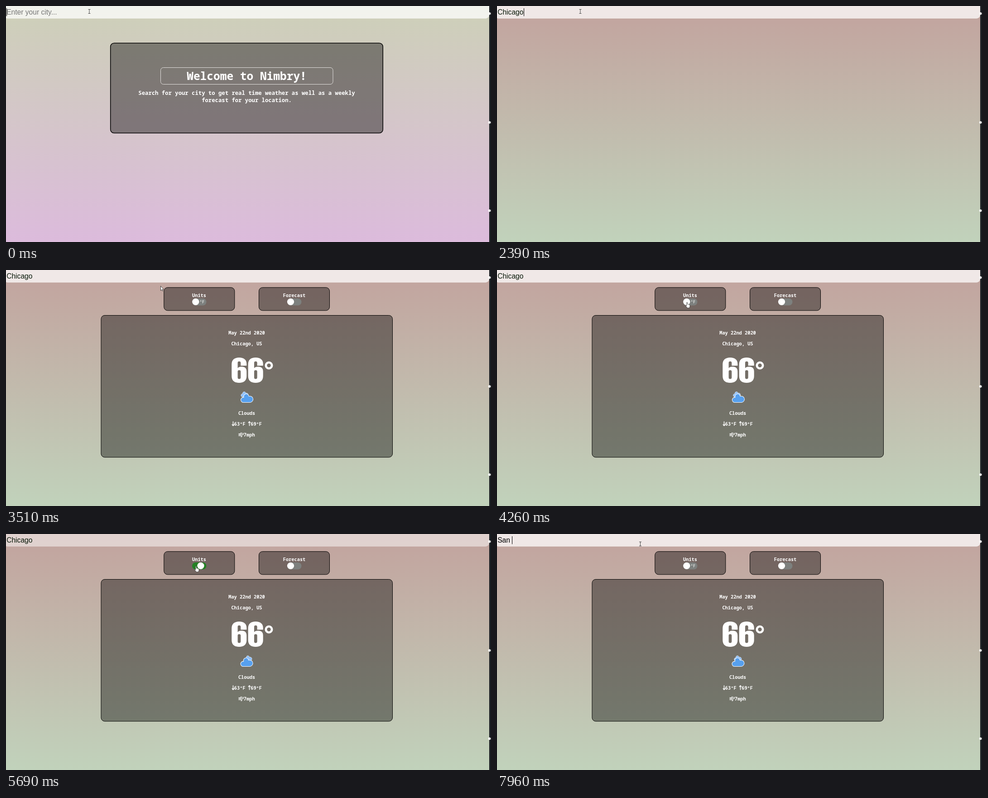
An HTML page for the animation above (7.99 s loop, 1071 by 523 pixels).

```html
<!DOCTYPE html>
<html lang="en">
<head>
<meta charset="utf-8">
<title>Weather search</title>
<style>
html, body { margin: 0; width: 100%; height: 100%; overflow: hidden; }
svg { display: block; }
text { white-space: pre; }
.field { font: 15.6px "Liberation Sans", Arial, sans-serif; }
.mono { font-family: "Noto Sans Mono", Consolas, monospace; fill: #fff; }
.mid { text-anchor: middle; }
.title { font-size: 24.5px; font-weight: 700; }
.intro { font-size: 12.28px; font-weight: 700; }
.small { font-size: 10.33px; font-weight: 600; }
.unit { font-size: 9px; font-weight: 500; }
.card { fill: #000; fill-opacity: .405; stroke: #000; }
.cloud { stroke: #fff; stroke-width: 1.2; stroke-linejoin: round; }
.line { fill: none; stroke: #fff; stroke-width: 1.5; stroke-linecap: round; stroke-linejoin: round; }
</style>
</head>
<body>
<svg width="1071" height="523" viewBox="0 0 1071 523">
  <defs>
    <linearGradient id="warm" x2="0" y2="1"><stop stop-color="#cdd0b8"/><stop offset="1" stop-color="#dcbbdc"/></linearGradient>
    <linearGradient id="cool" x2="0" y2="1"><stop stop-color="#c2a39e"/><stop offset="1" stop-color="#c1d2bb"/></linearGradient>
    <path id="puff" d="M47.7 35.4c0-4.6-3.7-8.2-8.2-8.2-1 0-1.9.2-2.8.5-.3-3.4-3.1-6.2-6.6-6.2-3.7 0-6.7 3-6.7 6.7 0 .8.2 1.6.4 2.3-.3-.1-.7-.1-1-.1-3.7 0-6.7 3-6.7 6.7 0 3.6 2.9 6.6 6.5 6.7h17.2c4.4-.5 7.9-4 7.9-8.4z"/>
    <path id="six" fill-rule="evenodd" d="M33 18H20V12C20 9.500 19 8.500 16.600 8.500S13.300 9.500 13.300 12V23.500C15 21.500 18 20.300 22 20.300C29.500 20.300 33 24 33 31V41C33 51 27 56 16.500 56S0 51 0 41V15C0 5 6 0 16.500 0S33 5 33 14ZM13.300 31V44C13.300 46.500 14.300 47.500 16.600 47.500S20 46.500 20 44V31C20 29 19 28 16.600 28S13.300 29 13.300 31Z"/>
    <path id="one" d="M23 0V55H10V21C10 15 9 13.500 0 13.500V7.500C8 6 12 4 14.500 0Z"/>
    <circle id="degree" r="6.600" fill="none" stroke="#fff" stroke-width="4.800"/>
    <path id="down" class="line" d="M0-4.500V4.500M-2.200 2L0 4.700L2.200 2"/>
  </defs>

  <rect id="sky" width="1067" height="523"/>

  <g id="welcome">
    <rect class="card" x="230.700" y="82.200" width="601.600" height="199.300" rx="8" stroke-width="1.500"/>
    <rect x="341.500" y="136.500" width="380.500" height="37" rx="6" fill="none" stroke="#e3e1df"/>
    <text class="mono mid title" x="531.500" y="164">Welcome to Nimbry!</text>
    <text class="mono mid intro" x="531.500" y="197">Search for your city to get real time weather as well as a weekly</text>
    <text class="mono mid intro" x="531.500" y="213">forecast for your location.</text>
  </g>

  <g id="weather">
    <rect class="card" x="348.800" y="38.800" width="156" height="51" rx="8"/>
    <rect class="card" x="558.500" y="38.800" width="156" height="51" rx="8"/>
    <rect class="card" x="210" y="100.500" width="643.500" height="314.500" rx="8"/>
    <text class="mono mid small" x="426.500" y="60">Units</text>
    <text class="mono mid small" x="636.500" y="60">Forecast</text>
    <rect x="411" y="63" width="31.500" height="15.500" rx="7.750" fill="#7d807e"/>
    <rect id="green" x="411" y="63" width="31.500" height="15.500" rx="7.750" fill="#008000"/>
    <text id="unitF" class="mono unit" x="427.500" y="74">°F</text>
    <text id="unitC" class="mono unit" x="413.500" y="74">°C</text>
    <circle id="knob" cy="70.500" r="7.600" fill="#fff"/>
    <rect x="621" y="63" width="31.500" height="15.500" rx="7.750" fill="#7d807e"/>
    <circle cx="628.500" cy="70.500" r="7.600" fill="#fff"/>

    <text class="mono mid small" x="531.500" y="143">May 22nd 2020</text>
    <text class="mono mid small" x="531.500" y="167">Chicago, US</text>
    <g id="bigF" fill="#fff" role="img" aria-label="66°">
      <use href="#six" x="498.300" y="194"/><use href="#six" x="534.700" y="194"/><use href="#degree" x="580.500" y="211.500"/>
    </g>
    <g id="bigC" fill="#fff" role="img" aria-label="19°">
      <use href="#one" x="501.500" y="194"/><use href="#six" transform="translate(562.300 250) rotate(180)"/><use href="#degree" x="575" y="211.500"/>
    </g>
    <g transform="translate(504.100 257) scale(.855)">
      <g id="back"><use href="#puff" class="cloud" fill="#91c0f8" transform="translate(10 2) scale(.6)"/></g>
      <g id="front"><use href="#puff" class="cloud" fill="#57a0ee" transform="translate(0 -1)"/></g>
    </g>
    <text class="mono mid small" x="531.500" y="321">Clouds</text>
    <use href="#down" x="501.500" y="340.500"/>
    <use href="#down" transform="translate(537.500 340.500) scale(1 -1)"/>
    <text id="low" class="mono small" x="503.800" y="345"></text>
    <text id="high" class="mono small" x="540.200" y="345"></text>
    <path class="line" style="stroke-width:1.300" d="M514 363H518.500C520.500 363 520.500 360.500 518.500 360.800M514 365.200H522.500C525 365.200 524.500 361.200 521.800 362M514 367.400H519.500C521.500 367.400 521.300 370 519 369.600"/>
    <text id="wind" class="mono small" x="524.800" y="369"></text>
  </g>

  <rect id="bar" x="-4" y="-12" width="1071" height="39.700" rx="8" fill="#fff"/>
  <rect id="selection" x="2" y="5" width="57" height="17.500" fill="#3390ff"/>
  <text id="typed" class="field" x="1.200" y="19"></text>
  <rect id="caret" y="5" width="1" height="17.500"/>

  <rect x="1067" width="4" height="523" fill="#1e2226"/>
  <g fill="#fff"><circle cx="1067.600" cy="16.700" r="2.700"/><circle cx="1067.600" cy="258" r="2.700"/><circle cx="1067.600" cy="453.500" r="2.700"/></g>

  <g id="cursor">
    <path id="beam" fill="none" stroke="#444" d="M-2.500-4.500H2.500M0-4.500V4.500M-2.500 4.500H2.500"/>
    <path id="arrow" fill="#fff" stroke="#222" stroke-width=".8" d="M.500.500V10.500L2.800 8.400L4.300 11.700L5.800 11L4.400 7.800H7Z"/>
    <path id="hand" fill="#fff" stroke="#222" stroke-width=".7" d="M-.8 0Q.3-1 1.200 0V4Q2.200 3.300 3 4.300Q4.100 3.700 4.800 4.800Q6.300 4.500 6.500 6V9L5.300 12H.5L-2.600 7.500Q-2.500 5.900-.8 7.200Z"/>
  </g>
</svg>
<script>
const LOOP = 7990;
const SEARCH = 2390, RESULT = 2900;
const TO_C = 4300, TO_F = 5550;
const FOCUS = 6250, SELECT = 6450, RETYPE = 7110;

const typing = [
  [0, ""], [1010, "C"], [1370, "Ch"], [1570, "Chi"], [1660, "Chic"], [1750, "Chica"],
  [1840, "Chicag"], [1930, "Chicago"], [RETYPE, "S"], [7260, "Sa"], [7410, "San"], [7610, "San "]
];
const caretOn = [[0, 400], [960, 2460], [FOCUS, SELECT], [RETYPE, LOOP]];
const pointer = [
  [RESULT, 184, 12], [3450, 341, 35], [3700, 341, 35], [4200, 419.5, 72],
  [5700, 419.5, 72], [6150, 316.5, 22]
];

const el = Object.fromEntries([...document.querySelectorAll("[id]")].map(e => [e.id, e]));
const show = (e, on) => e.style.display = on ? "" : "none";
const label = (e, s) => { if (e.textContent !== s) e.textContent = s; };
const shift = (e, x, y = 0) => e.setAttribute("transform", `translate(${x} ${y})`);
const smooth = p => p * p * (3 - 2 * p);
const fade = (t, start, length) => smooth(Math.min(1, Math.max(0, (t - start) / length)));
const swing = (t, period) => 1 - Math.abs(1 - 2 * (t % period) / period);

function pointerAt(t) {
  const next = pointer.findIndex(p => p[0] > t);
  if (next === 0) return pointer[0].slice(1);
  if (next < 0) return pointer[pointer.length - 1].slice(1);
  const [a, b] = [pointer[next - 1], pointer[next]];
  const p = fade(t, a[0], b[0] - a[0]);
  return [1, 2].map(i => a[i] + (b[i] - a[i]) * p);
}

function drawField(t) {
  const value = typing.filter(step => step[0] <= t).pop()[1];
  const selected = t >= SELECT && t < RETYPE;
  label(el.typed, value || "Enter your city...");
  el.typed.setAttribute("fill", selected ? "#fff" : !value ? "#757575" : t >= SEARCH && t < RETYPE ? "#0a1a0a" : "#000");
  show(el.selection, selected);
  show(el.caret, caretOn.some(([from, to]) => t >= from && t < to));
  const width = value ? el.typed.getComputedTextLength() : 0;
  el.caret.setAttribute("x", Math.floor(1.9 + width));
  el.bar.setAttribute("fill-opacity", .75 - .25 * (fade(t, TO_C, 500) - fade(t, FOCUS, 300)));
}

function drawWeather(t) {
  const celsius = t >= TO_C && t < TO_F;
  const on = fade(t, TO_C, 400) - fade(t, TO_F, 400);
  show(el.welcome, t < SEARCH);
  show(el.weather, t >= RESULT);
  el.sky.setAttribute("fill", t < SEARCH ? "url(#warm)" : "url(#cool)");
  el.green.setAttribute("opacity", on);
  el.knob.setAttribute("cx", 418.8 + 15.6 * on);
  show(el.unitF, !celsius);
  show(el.unitC, celsius);
  show(el.bigF, !celsius);
  show(el.bigC, celsius);
  label(el.low, celsius ? "17°C" : "63°F");
  label(el.high, celsius ? "23°C" : "69°F");
  label(el.wind, celsius ? "3m/s" : "7mph");
  const drift = Math.max(0, t - RESULT);
  shift(el.back, -5 + 15 * swing(drift, 7000));
  shift(el.front, 2 * swing(drift, 3000));
}

function drawPointer(t) {
  const [x, y] = pointerAt(t);
  const overField = y < 28, overToggle = x > 411 && y > 63;
  shift(el.cursor, x, y);
  show(el.beam, overField);
  show(el.hand, overToggle);
  show(el.arrow, !overField && !overToggle);
}

const start = performance.now();
function frame() {
  const t = (performance.now() - start) % LOOP;
  drawField(t);
  drawWeather(t);
  drawPointer(t);
  requestAnimationFrame(frame);
}
frame();
</script>
</body>
</html>
```
